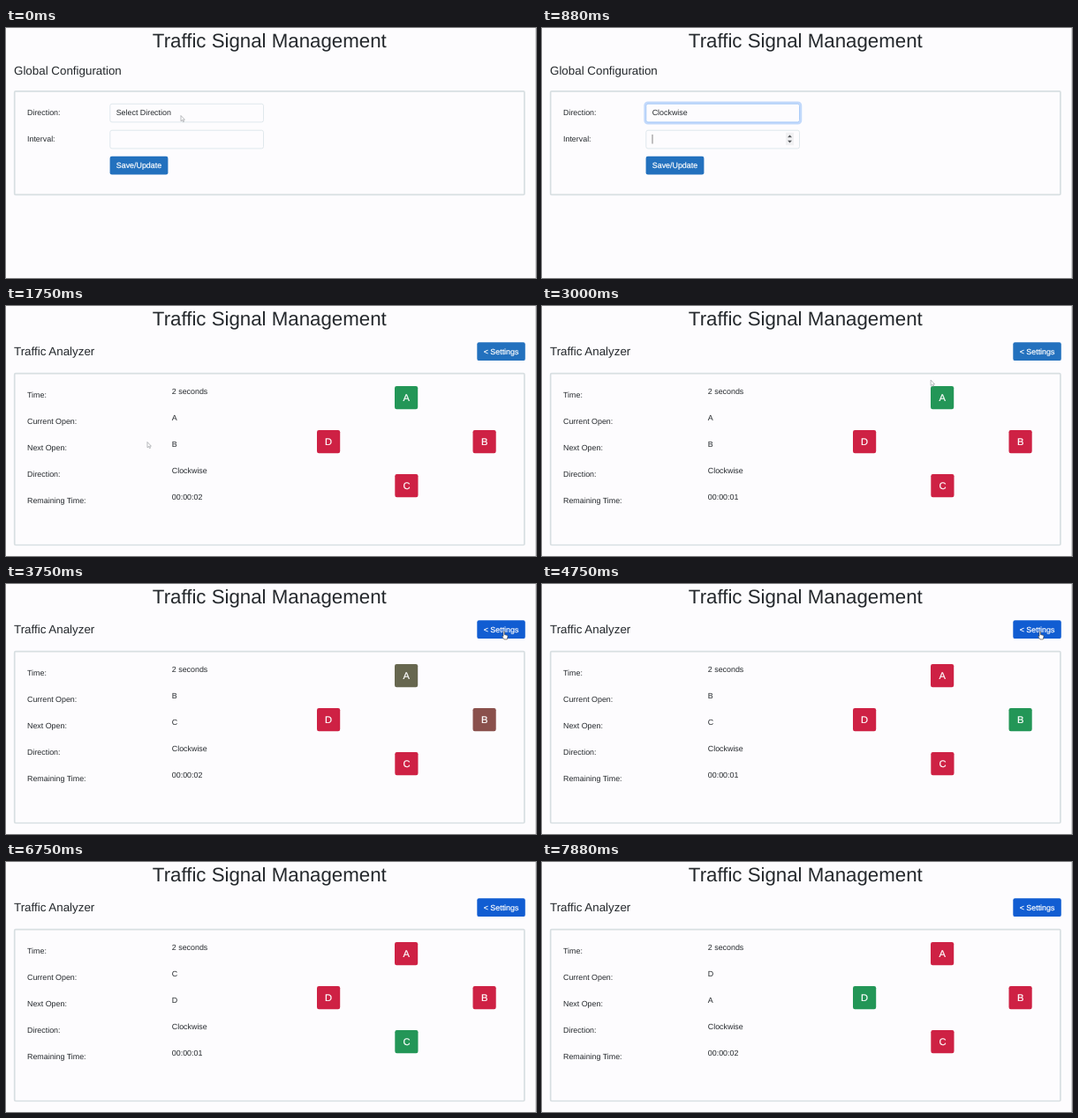
An HTML page that plays this animation: 600x284 px, repeating every 8 s.

```html
<!DOCTYPE html>
<html lang="en">
<head>
<meta charset="utf-8">
<title>Traffic Signal Management</title>
<style>
  html, body { margin: 0; width: 100%; height: 100%; overflow: hidden; background: #fdfcfe; }
  svg { display: block; width: 600px; height: 284px; font-family: "Liberation Sans", Arial, sans-serif; text-rendering: geometricPrecision; }
  .label { stroke: #fff; stroke-width: .2px; }
</style>
</head>
<body>
<svg id="stage" viewBox="0 0 600 284"></svg>
<script>
const stage = document.getElementById('stage');
const LOOP = 8000, TICK = 125, SAVED = 1750;
const INK = '#24282c', BLUE = '#2371be', HOVER_BLUE = '#115dd2';
const RED = [206, 33, 68], GREEN = [35, 150, 87];
const BODY = 8.9;

const text = (x, y, value, size = BODY, attrs = `fill="${INK}"`) =>
  `<text x="${x}" y="${y}" font-size="${size}" ${attrs}>${value}</text>`;

const rect = (x, y, w, h, attrs, radius = 2.2) =>
  `<rect x="${x}" y="${y}" width="${w}" height="${h}" rx="${radius}" ${attrs}/>`;

const button = (x, y, w, h, label, fill, size = BODY) =>
  rect(x, y, w, h, `fill="${fill}"`) +
  text(x + w / 2, y + h / 2 + size * 0.33, label, size, 'class="label" fill="#fff" text-anchor="middle"');

const ring = (x, y, w, h, opacity = 1) =>
  rect(x - 1.2, y - 1.2, w + 2.4, h + 2.4, `fill="none" stroke="#c2d9fb" stroke-width="2.5" opacity="${opacity}"`, 3.2);

const field = (y, focus) =>
  (focus ? ring(117.8, y, 174, 21, focus) : '') +
  rect(117.8, y + 0.2, 173.7, 20.7, `fill="#fdfcfe" stroke="${focus ? '#98c0f7' : '#d9e2e8'}" stroke-width=".8"`);

const card = (y, h) =>
  rect(9.7, y, 577.2, h, 'fill="none" stroke="#d8dfe2" stroke-width="1.7"', 1.2);

const caret = (x, y) => `<path d="M${x} ${y}v10.5" stroke="#777" stroke-width=".9"/>`;

const pointers = {
  arrow: '<path d="M0 0V6.3L1.5 5L2.5 7.2L3.5 6.8L2.6 4.7H4.4Z" fill="#fff" stroke="#8b8f94" stroke-width=".6"/>',
  hand: '<path d="M1 .8Q1.8-.3 2.5.8V4L5.4 4.8Q6.2 5 6 6.2L5.3 9.4H1.9L-.5 6Q-.2 4.9 1 6Z" fill="#fff" stroke="#333" stroke-width=".6"/>',
};
const pointer = (kind, x, y) => `<g transform="translate(${x} ${y})">${pointers[kind]}</g>`;

const header = subtitle =>
  text(298.3, 22, 'Traffic Signal Management', 22.27, `fill="${INK}" text-anchor="middle"`) + subtitle +
  '<path d="M599.5 0V284" stroke="#d3d3d6"/>';

const spinner =
  rect(276, 118.7, 9, 14.5, 'fill="#f1f1f3"', 0) +
  '<path d="M278 124.2L280.5 121.5L283 124.2ZM278 127.8L280.5 130.5L283 127.8Z" fill="#55585c"/>';

function settingsPage(t) {
  const chosen = t >= 625, hovered = t >= 1375, pressed = t >= 1500;
  const directionFocus = t >= 1000 ? 0 : Math.min(1, t / 150);
  const intervalFocus = t >= 1000 && !pressed ? 1 : 0;
  let out = header(text(9, 53.1, 'Global Configuration', 13.37)) + card(71.9, 117.5) +
    text(24, 99.3, 'Direction:') + text(24, 129.3, 'Interval:') +
    field(86, directionFocus) + field(116, intervalFocus) +
    text(124.7, 99, chosen ? 'Clockwise' : 'Select Direction');
  if (t >= 750 && !hovered) out += spinner;
  if (t >= 1250) out += text(124.7, 129.1, '2');
  else if (t >= 750) out += caret(125, 121);
  if (pressed) out += ring(117.6, 145.7, 65.8, 20.8);
  out += button(117.6, 145.7, 65.8, 20.8, 'Save/Update', hovered ? HOVER_BLUE : BLUE);
  if (t < TICK) out += pointer('arrow', 198, 99.5);
  if (hovered) out += pointer('hand', 160, 155);
  return out;
}

const mix = (from, to, k) => `rgb(${from.map((v, i) => Math.round(v + (to[i] - v) * k))})`;

function signals(open, sinceOpen) {
  const places = [['A', 440, 91], ['B', 528.5, 141], ['C', 440.3, 191], ['D', 352, 141]];
  const k = open > 0 && sinceOpen < TICK ? 0.4 : 1;
  return places.map(([name, x, y], i) => {
    const fill = i === open ? mix(RED, GREEN, k) : i === open - 1 ? mix(GREEN, RED, k) : mix(RED, RED, 1);
    return button(x, y, 26.2, 26.2, name, fill, 11.13);
  }).join('');
}

function ease(t, from, to) {
  const p = Math.min(1, Math.max(0, (t - from) / (to - from)));
  return p * p * (3 - 2 * p);
}

// The pointer travels to the Settings button in two strokes with a rest between.
function mousePointer(t) {
  if (t >= 5500) return '';
  if (t >= 3500) return pointer('hand', 562, 53.5);
  const k = (ease(t, SAVED, 2250) + ease(t, 2625, 3500)) / 2;
  return pointer('arrow', 160 + 402 * k, 154.5 - 101 * k);
}

function analyzerPage(t) {
  const elapsed = t - SAVED, open = Math.floor(elapsed / 2000), sinceOpen = elapsed % 2000;
  const rows = [
    ['Time:', '2 seconds'],
    ['Current Open:', 'ABCD'[open]],
    ['Next Open:', 'ABCD'[(open + 1) % 4]],
    ['Direction:', 'Clockwise'],
    ['Remaining Time:', '00:00:0' + (sinceOpen < 1000 ? 2 : 1)],
  ];
  return header(text(9, 55.7, 'Traffic Analyzer', 13.37)) + card(76.7, 194.8) +
    button(533.3, 41.3, 54.5, 20.8, '&lt; Settings', t >= 3500 ? HOVER_BLUE : BLUE) +
    rows.map(([label, value], i) =>
      text(24, 103.9 + i * 30.05, label) + text(187.8, 100.1 + i * 30, value)).join('') +
    signals(open, sinceOpen) + mousePointer(t);
}

let shown = -1;
function draw(now) {
  const t = Math.floor((now % LOOP) / TICK) * TICK;
  if (t !== shown) {
    shown = t;
    stage.innerHTML = t < SAVED ? settingsPage(t) : analyzerPage(t);
  }
}

const start = performance.now();
function loop() {
  draw(performance.now() - start);
  requestAnimationFrame(loop);
}
loop();
</script>
</body>
</html>
```
